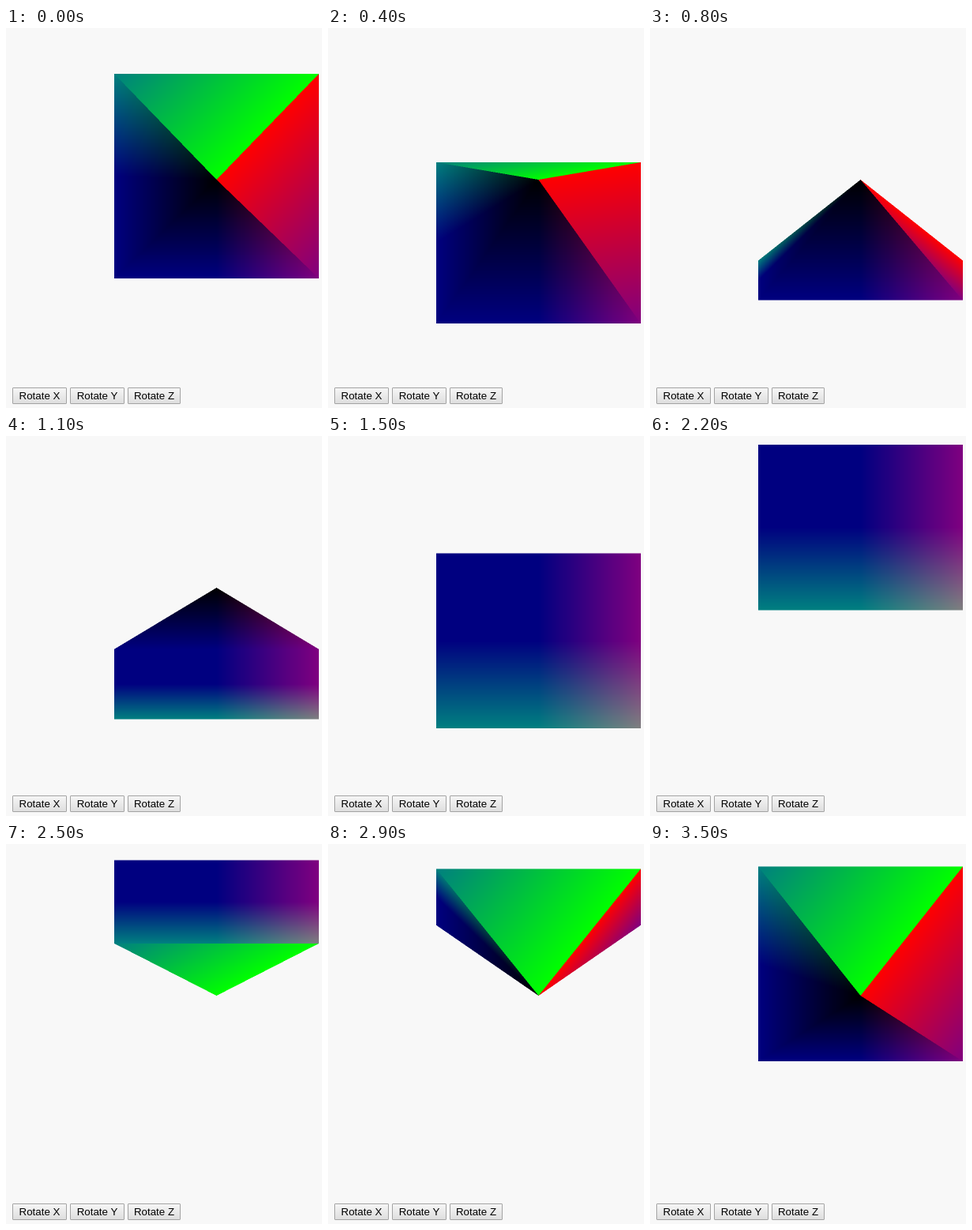
Recreate the animation shown at these times as an HTML page with a canvas. Size 400 by 481 pixels, loop 3600 ms.

```html
<!DOCTYPE html>
<html lang="en">
<head>
<meta charset="utf-8">
<title>Rotating pyramid</title>
<style>
  html, body { margin: 0; width: 100%; height: 100%; overflow: hidden; background: #f8f8f8; }
  canvas { position: absolute; left: 0; top: 0; }
  .btn {
    position: absolute; top: 455px; width: 69px; height: 21px;
    box-sizing: border-box; border: 1px solid #a3a3a3; border-radius: 1px;
    background: linear-gradient(#f6f6f6, #dedede);
    font: 13.333px/19px "Liberation Sans", Arial, sans-serif;
    color: #000; text-align: center; white-space: nowrap;
  }
</style>
</head>
<body>
<canvas id="stage" width="400" height="481"></canvas>
<div class="btn" style="left:8px">Rotate X</div>
<div class="btn" style="left:81px">Rotate Y</div>
<div class="btn" style="left:154px; width:67px">Rotate Z</div>
<script>
const W = 400, H = 481, LOOP = 3600, STEP = 100, BG = 248;
const CX = 266.5, CY = 192, SIZE = 129.5, DEPTH = 130;
const ctx = document.getElementById('stage').getContext('2d');

// Vertex: x, y (up), depth behind the apex
const A = [0, 0, 0], TL = [-1, 1, 1], TR = [1, 1, 1], BR = [1, -1, 1], BL = [-1, -1, 1];
const tint = v => v.map(c => c / 2);
const GREEN = [0, 1, 0], RED = [1, 0, 0];
const face = (pts, colors = pts.map(tint)) => ({ pts, colors });
const faces = [
  face([A, TL, TR], [GREEN, tint(TL), GREEN]),
  face([A, TR, BR], [RED, RED, tint(BR)]),
  face([A, BR, BL]),
  face([A, BL, TL]),
  face([TL, BL, BR]),
  face([TL, BR, TR])
];

// Time in ms, angle in degrees
const turn = [[0, -2], [400, 38], [600, 58], [1100, 110], [1800, 178],
  [1900, 186], [2500, 246], [2900, 286], [3500, 342], [3600, 358]];

function angleAt(t) {
  let i = 1;
  while (i < turn.length - 1 && t >= turn[i][0]) i++;
  const [t0, a0] = turn[i - 1], [t1, a1] = turn[i];
  return a0 + (a1 - a0) * (t - t0) / (t1 - t0);
}

const cross = (ax, ay, bx, by) => ax * by - ay * bx;

function rotateX(deg) {
  const r = deg * Math.PI / 180, c = Math.cos(r), s = Math.sin(r);
  return ([x, y, d]) => [CX + SIZE * x, CY - SIZE * y * c + DEPTH * d * s];
}

// Adds one triangle's colour samples (2 x 2 per pixel) to the buffers
function fillFace({ pts, colors }, project, sum, hits) {
  const [p, q, r] = pts.map(project);
  const ux = q[0] - p[0], uy = q[1] - p[1], vx = r[0] - p[0], vy = r[1] - p[1];
  const area = cross(ux, uy, vx, vy);
  if (area <= 1) return;
  const xs = [p[0], q[0], r[0]], ys = [p[1], q[1], r[1]];
  const x0 = Math.floor(Math.min(...xs)), x1 = Math.ceil(Math.max(...xs));
  const y0 = Math.floor(Math.min(...ys)), y1 = Math.ceil(Math.max(...ys));
  for (let y = y0; y < y1; y++) for (let x = x0; x < x1; x++) {
    const k = y * W + x;
    for (let n = 0; n < 4; n++) {
      const dx = x + 0.25 + (n & 1) / 2 - p[0];
      const dy = y + 0.25 + (n >> 1) / 2 - p[1];
      const b = cross(dx, dy, vx, vy) / area, c = cross(ux, uy, dx, dy) / area;
      if (b < 0 || c < 0 || b + c > 1 || hits[k] > 3) continue;
      hits[k]++;
      for (let i = 0; i < 3; i++) {
        const v = colors[0][i] * (1 - b - c) + colors[1][i] * b + colors[2][i] * c;
        sum[k * 3 + i] += 255 * Math.max(0, v);
      }
    }
  }
}

function draw(t) {
  const project = rotateX(angleAt(t));
  const sum = new Float32Array(W * H * 3), hits = new Uint8Array(W * H);
  for (const f of faces) fillFace(f, project, sum, hits);
  const img = ctx.createImageData(W, H);
  for (let k = 0; k < W * H; k++) {
    for (let i = 0; i < 3; i++) {
      img.data[k * 4 + i] = (sum[k * 3 + i] + (4 - hits[k]) * BG) / 4;
    }
    img.data[k * 4 + 3] = 255;
  }
  ctx.putImageData(img, 0, 0);
}

const start = performance.now();
let shown = -1;
function tick() {
  const t = (performance.now() - start) % LOOP;
  const step = Math.floor(t / STEP);
  if (step !== shown) draw((shown = step) * STEP);
  requestAnimationFrame(tick);
}
tick();
</script>
</body>
</html>
```
